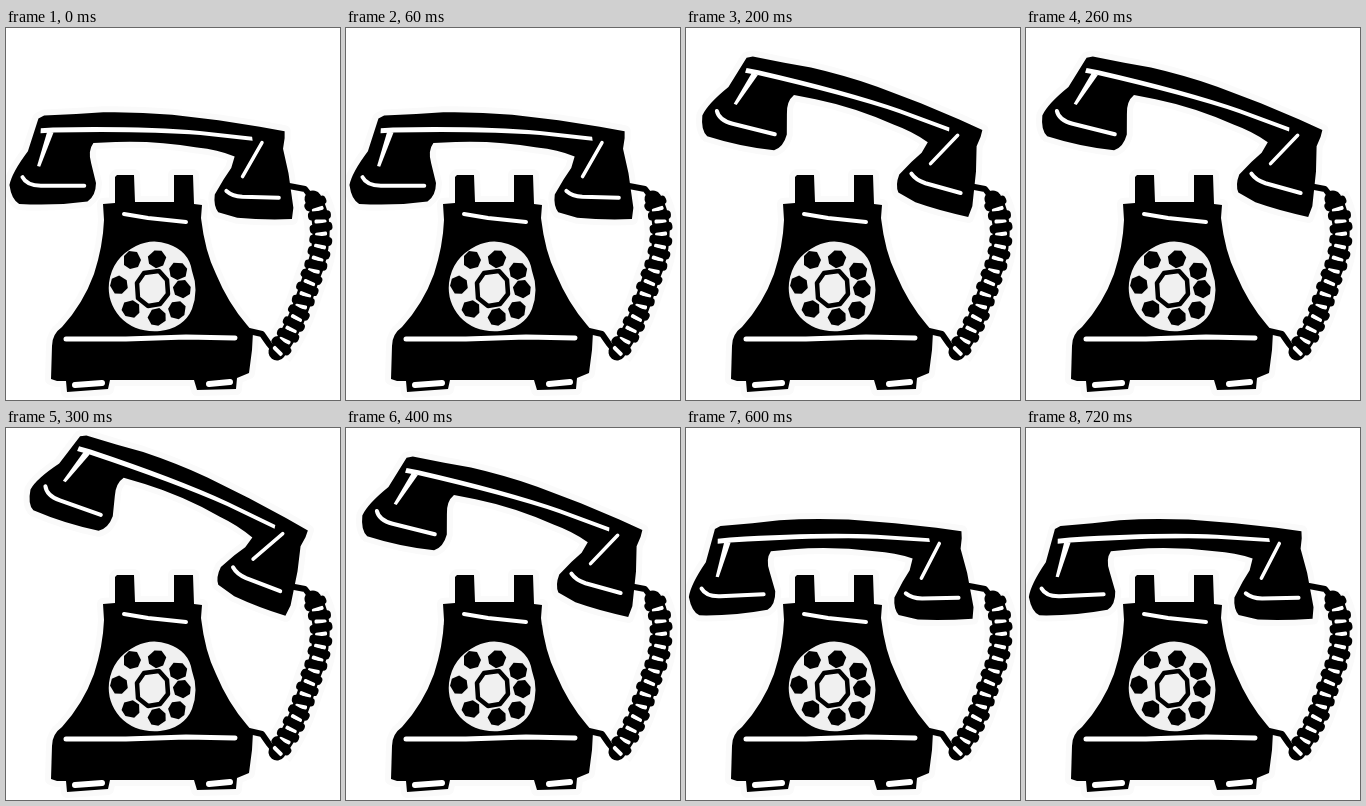
These frames come from a looping animation (334 by 372 pixels, 800 ms). An HTML page:

```html
<!DOCTYPE html>
<html lang="en">
<head>
<meta charset="utf-8">
<title>Ringing telephone</title>
<style>
  html, body { margin: 0; width: 100%; height: 100%; overflow: hidden; background: #fff; }
  svg { display: block; width: 100%; height: 100%; }
  .halo { fill: none; stroke: #fafafa; stroke-width: 12; stroke-linejoin: round; }
  .line { fill: none; stroke: #000; stroke-linecap: round; stroke-linejoin: round; }
  .shine { fill: none; stroke: #fff; stroke-width: 4; stroke-linecap: round; stroke-linejoin: round; }
  .white { fill: #fff; }
  .dial { fill: #f0f0f0; }
</style>
</head>
<body>
<svg viewBox="0 0 334 372">
  <defs>
    <path id="base" d="M109 149 L111 147 L128 147 L129 174 L168 174 L168 147 L187 147 L188 176 L196 177 L195 190
      Q199 224 210 246 Q222 275 241 297 L247 304 L246 322 L243 345 L231 350 L230 361 L191 362 L188 352
      L104 352 L102 361 L61 364 L60 353 L51 353 L45 351 L46 318 Q46 306 56 299 Q77 276 88 246 Q97 218 98 192 L97 176 L109 175 Z"/>
    <path id="handset" d="M47 56 L53 54 L85 57 L112 59 Q145 63 180 71 L225 83 L265 95 L289 103 L288 110 L285 120 L287 145 L287 180
      L284 191 Q255 188 230 182 L212 174 Q208 167 211 156 L222 142 L231 132 L236 121 Q220 112 200 107 Q160 94 120 90
      L98 88 Q91 95 93 108 L95 128 Q93 141 84 145 Q50 145 16 138 Q9 133 9 118 Q13 106 32 87 Z"/>
    <path id="coil" d="M307 171 C320 192 316 225 305 250 C297 273 290 299 271 324"/>
  </defs>

  <use href="#base" class="halo"/>
  <use href="#coil" class="halo" style="stroke-width:33"/>
  <use href="#handset" class="halo pose"/>

  <path class="line" stroke-width="6" d="M283 158 L299 161 L306 170 M243 303 L256 306 L263 316 L271 326"/>
  <use href="#coil" class="line" stroke-width="17"/>
  <g id="links"></g>

  <use href="#base"/>
  <path class="shine" d="M118 186 L142 190 L180 194"/>
  <path class="shine" style="stroke-width:5" d="M60 311 L120 311 L180 309 L229 310"/>
  <path class="shine" style="stroke-width:6" d="M69 357 L96 355 M203 356 L224 354"/>

  <path class="dial" d="M130 218 Q146 210 162 216 Q183 223 186 243 Q193 262 186 281 Q178 300 154 303
    Q129 305 114 289 Q101 274 103 255 Q106 230 130 218 Z"/>
  <g id="holes"></g>
  <path class="line" stroke-width="4.5" d="M138 245 L153 243 L161 252 L162 266 L154 276 L142 278 L132 270 L131 255 Z"/>

  <g class="pose">
    <use href="#handset"/>
    <path class="white" d="M48 66 L60 67 Q150 78 205 91 L256 104 L256 108 L205 95 Q150 83 60 72 L47 71 Z"/>
    <path class="white" d="M54 70 L60 72 L42 104 L39 103 Z"/>
    <path class="shine" d="M23 112 Q26 121 40 123 L83 129"/>
    <path class="shine" style="stroke-width:3.5" d="M265 111 L241 142"/>
    <path class="shine" d="M223 154 Q228 160 238 162 L274 168"/>
  </g>
</svg>
<script>
  // Each pose: angle about the right earpiece, then a small shift.
  const rest = [-10.5, 2, -0.5], lift = [-8, 1.5, 0], mid = [0, 0, 0], high = [6, -1.5, -2], peak = [11.5, -4, -3];
  const poses = [lift, mid, high, peak, high, mid, rest, rest];
  const step = 100;
  const parts = document.querySelectorAll(".pose");

  const holes = [[126, 232], [151, 231], [172, 243], [176, 261], [171, 282], [151, 289], [125, 281], [113, 257]];
  document.getElementById("holes").innerHTML = holes.map(([x, y], i) =>
    `<path transform="translate(${x} ${y}) rotate(${i * 47})" d="M-8 -4 L-3 -9 L5 -8 L9 0 L6 7 L-2 9 L-8 5 Z"/>`).join("");

  // Rounded beads along the cord with a white slit between neighbours.
  const coil = document.getElementById("coil"), beads = 13;
  const pitch = coil.getTotalLength() / beads;
  function onCoil(distance, tilt, shape) {
    const a = coil.getPointAtLength(distance - 1), b = coil.getPointAtLength(distance + 1);
    const turn = Math.atan2(b.y - a.y, b.x - a.x) * 180 / Math.PI - 90 + tilt;
    return `<g transform="translate(${(a.x + b.x) / 2} ${(a.y + b.y) / 2}) rotate(${turn})">${shape}</g>`;
  }
  document.getElementById("links").innerHTML = Array.from({ length: beads }, (_, i) => {
    const tilt = 9 * Math.sin(i * 2.2);
    return onCoil((i + 0.4) * pitch, tilt, '<rect x="-11.5" y="-4.5" width="23" height="9" rx="4"/>') +
      onCoil((i + 0.9) * pitch, tilt, '<rect class="white" x="-6" y="-2" width="12" height="4" rx="1.5"/>');
  }).join("");

  function draw(time) {
    const [angle, dx, dy] = poses[Math.floor(time / step) % poses.length];
    const transform = `translate(${dx} ${dy}) rotate(${angle} 285 188)`;
    parts.forEach(part => part.setAttribute("transform", transform));
  }

  const start = performance.now();
  function tick() {
    draw(performance.now() - start);
    requestAnimationFrame(tick);
  }
  tick();
</script>
</body>
</html>
```
